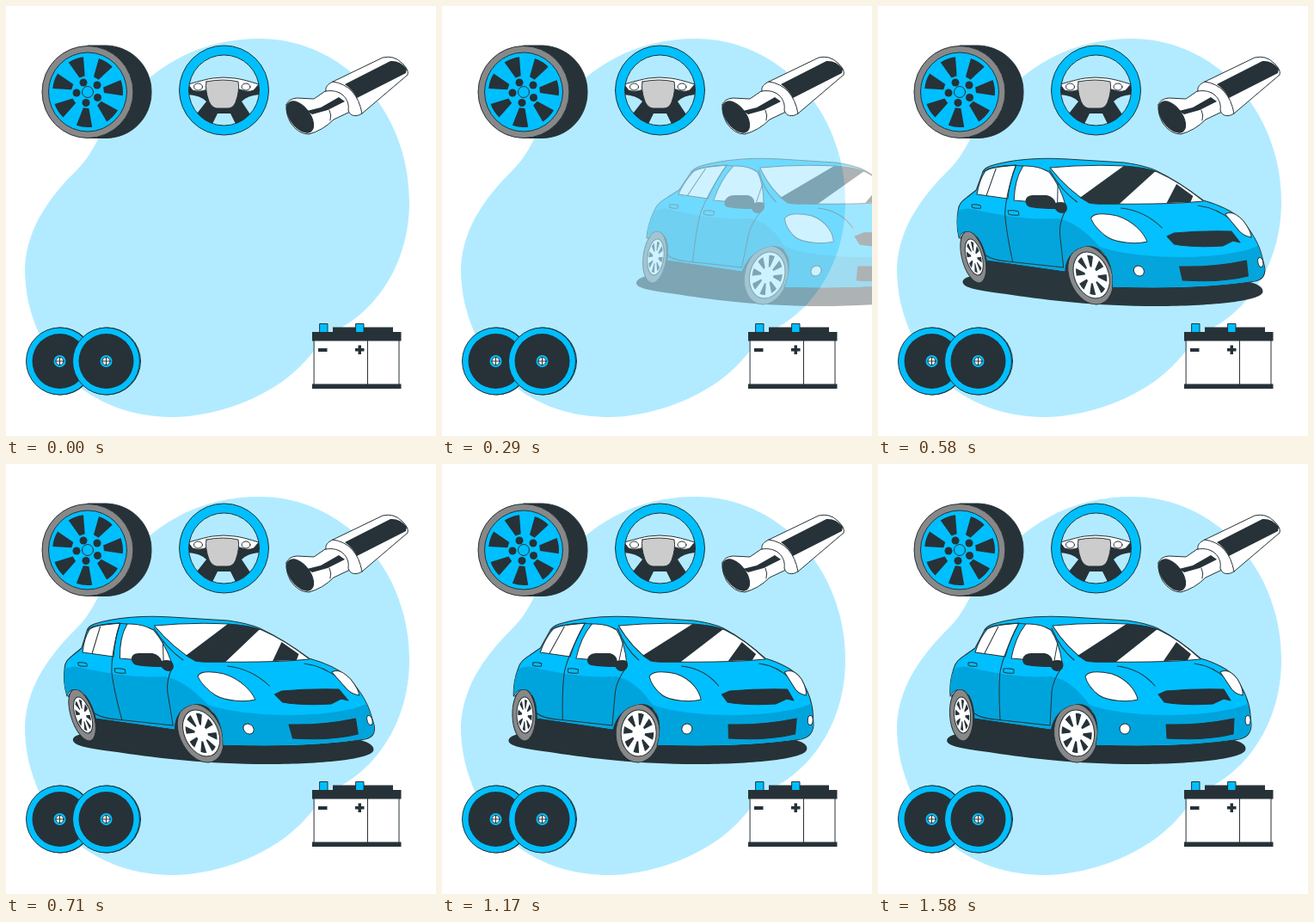
Write an HTML page that moves like this. It is 500 by 500 pixels and loops after 1.62 s.

```html
<!DOCTYPE html>
<html lang="en">
<head>
<meta charset="utf-8">
<title>Car parts</title>
<style>
  html, body { margin: 0; width: 100%; height: 100%; overflow: hidden; background: #fff; }
  svg { display: block; width: 100vw; height: 100vh; }
  .ink { fill: #263238; }
  .blue { fill: #00bfff; }
  .shade { fill: #00a4dc; }
  .white { fill: #fff; }
  .grey { fill: #888; }
  .line { fill: none; }
  .edge, .line { stroke: #263238; stroke-width: 1; stroke-linejoin: round; stroke-linecap: round; }
</style>
</head>
<body>
<svg viewBox="0 0 500 500">
  <path fill="#b2ebff" d="M295 38C390 38 469 120 469 228C469 300 430 352 390 374C366 385 360 402 340 421C300 460 235 478 195 478C120 478 65 440 40 385C28 358 22 335 22 305C24 255 55 218 82 191C107 166 104 150 130 122C170 70 225 38 295 38Z"/>

  <g id="tyre">
    <path class="ink edge" d="M95 46H117C146 47 169 70 169 100S146 153 117 153.500H95Z"/>
    <ellipse class="grey edge" cx="95" cy="100" rx="53" ry="53.500"/>
    <ellipse class="blue edge" cx="95" cy="100" rx="45.500" ry="46"/>
    <path class="ink" id="tyreGaps" transform="translate(95 100)"/>
    <g class="ink">
      <circle cx="90" cy="89" r="4.500"/><circle cx="106" cy="92" r="4.500"/><circle cx="82" cy="101" r="4.500"/>
      <circle cx="106.500" cy="106.500" r="4.500"/><circle cx="93" cy="112.500" r="4.500"/>
    </g>
    <circle class="blue edge" cx="95" cy="100" r="6.500"/>
  </g>

  <g id="steering">
    <path class="ink" d="M212 91Q253 83 295 91L294 103Q281 104 274 111L284 126Q277 134 267 137L261 125H246L240 137Q230 133 222 125L233 111Q226 104 212 103Z"/>
    <path class="white edge" d="M212 91Q233 85 240 84Q253 82 266 84Q275 85 294 91L288 98Q281 101 272 97H234Q225 101 217 98Z"/>
    <ellipse class="white edge" cx="223.500" cy="94" rx="5" ry="4"/>
    <ellipse class="white edge" cx="279" cy="94" rx="5" ry="4"/>
    <path class="edge" fill="#ccc" d="M233 88Q253 84 270 88Q272 98 267 112Q264 119 258 119H245Q239 118 236 111Q231 97 233 88Z"/>
    <path class="blue edge" fill-rule="evenodd" d="M201.500 98a52 52 0 1 0 104 0a52 52 0 1 0 -104 0ZM212.500 98a41 41 0 1 0 82 0a41 41 0 1 0 -82 0Z"/>
  </g>

  <g id="exhaust">
    <path class="white edge" d="M326 115Q328 108 338 107L358 108L377 95L406 110L400 123L381 132Q368 145 352 149Q340 149 331 136Q325 125 326 115Z"/>
    <ellipse class="ink edge" cx="342" cy="129" rx="21" ry="11.500" transform="rotate(53 342 129)"/>
    <path class="ink" d="M350 122L366 118L387 106L394 111L374 121L356 126Z"/>
    <path class="line" d="M376 121Q379 127 377 133"/>
    <path class="white edge" d="M372 99C371 94 374 91 380 88L438 60Q451 57 460 66Q469 74 467 80L414 125C408 129 400 129 398 121C400 108 389 96 372 99Z"/>
    <path class="ink" d="M394 91L447 64Q458 63 466 73L465 78L408 107Q403 97 394 91Z"/>
    <path class="line" d="M380 88Q408 92 414 125"/>
  </g>

  <g id="discs"></g>

  <g id="battery">
    <rect class="white edge" x="358.500" y="388" width="98.500" height="53"/>
    <path class="line" d="M420.500 389V440"/>
    <path class="ink" d="M356 379H380V373.500H450V379H459.500V389.500H356ZM356 439.500H459.500V445H356ZM363 398H373.500V402H363ZM409.500 394.500H413V398H416.500V401.500H413V405H409.500V401.500H406V398H409.500Z"/>
    <path class="blue edge" d="M365 369.500H374V379.500H365ZM407 369.500H416V379.500H407Z"/>
  </g>

  <g id="car" opacity="0">
    <path class="ink" d="M80 322C80 313 100 312 120 314L400 319C425 321 429 328 427 333C420 345 350 349 300 349C230 349 175 342 135 336C100 331 82 329 80 322Z"/>
    <path class="ink" d="M85 270Q95 256 112 275L140 285L205 275L240 276L258 300V330L110 322Z"/>
    <g id="wheels"></g>
    <path class="blue edge" d="M84 270C83 258 85 247 88 238C90 229 96 226 103 221L113 214L124 193Q126 189 134 186C160 178 195 176 225 178L290 182Q312 185 325 191Q350 204 375 226Q402 234 415 247C425 261 432 277 433 292L434 303Q434 317 420 320C370 328 310 329 253 327C259 305 254 280 234 279C214 280 204 294 201 309L112 296C112 276 105 262 96 262Q88 261 84 270Z"/>
    <path class="shade" d="M88.500 238Q100 233 112 238C140 244 170 249 202 247Q225 251 246 280C290 296 390 296 430 279Q433 292 433.500 303Q433 316 420 319.500C370 327 310 328 253.500 326.500C259 305 254 280 234 279C214 280 204 294 201 308L112.500 295C112 276 105 262 96 262Q88 261 84.500 269C83 258 85 247 88.500 238Z"/>
    <path class="white edge" d="M113 219Q118 203 127 192Q130 189 136 188L164 185Q154 202 148 224Z"/>
    <path class="white edge" d="M155 226C158 210 164 196 172 186Q189 185 201 193Q211 208 214 231Z"/>
    <path class="white edge" d="M203 188Q245 184 290 186Q315 188 327 193Q352 205 375 227Q330 231 270 230Q250 231 242 229Q220 215 203 188Z"/>
    <path class="ink" d="M232 223L289 186Q312 187 325 192L277 230Q250 231 242 229ZM332 229L347 207L364 221L360 228Z"/>
    <path class="line" d="M124 220L140 189M205 229L209 207M164 185Q146 220 142 242Q140 262 142 298M214 236Q203 252 202 265L200 304M112 290Q120 296 136 297L200 304M124 193Q145 183 172 186M202 191Q212 215 228 228M278 235Q305 238 322 258M368 232Q390 235 405 250"/>
    <path class="blue edge" d="M105 231Q110 230 115 232V235Q109 236 105 234ZM146 238Q152 237 158 239V243Q151 244 146 242Z"/>
    <path class="ink" d="M168 227Q170 220 178 220L194 220Q202 222 203 229Q209 227 214 229Q218 236 212 240Q205 243 201 236Q185 236 173 234Q168 233 168 227Z"/>
    <path class="white edge" d="M241 247C245 240 258 241 272 244C290 250 300 264 302 274C290 277 268 276 257 269Q244 259 241 247Z"/>
    <path class="white edge" d="M398 242Q408 237 418 250Q425 262 424 269Q414 268 408 257Z"/>
    <path class="ink edge" d="M326 268L335 264Q370 261 402 262L410 275L402 273L389 279Q355 281 333 277Z"/>
    <path class="ink edge" d="M335 303Q375 304 414 296L413 314Q380 322 336 319Z"/>
    <circle class="white edge" cx="287" cy="308" r="6"/>
    <ellipse class="white edge" cx="430" cy="298" rx="3" ry="5.500"/>
  </g>
</svg>
<script>
const $ = id => document.getElementById(id);
const LOOP = 1620, STEP = 1000 / 24, DURATION = 1600;

// Evenly spread openings between spokes; angles in degrees.
function gaps(count, first, inner, outer, innerHalf, outerHalf) {
  const at = (r, a) => `${r * Math.cos(a * Math.PI / 180)} ${r * Math.sin(a * Math.PI / 180)}`;
  return Array.from({ length: count }, (_, i) => {
    const angle = first + i * 360 / count;
    return `M${at(inner, angle - innerHalf)}L${at(outer, angle - outerHalf)}` +
      `A${outer} ${outer} 0 0 1 ${at(outer, angle + outerHalf)}L${at(inner, angle + innerHalf)}Z`;
  }).join('');
}

$('tyreGaps').setAttribute('d', gaps(7, -110, 19, 41, 10, 13));

$('discs').innerHTML = [62.5, 116.5].map(x => `
  <g transform="translate(${x} 413)">
    <circle class="blue edge" cx="1" r="39"/>
    <circle class="blue edge" r="39"/>
    <circle class="ink" r="32"/>
    <circle class="blue" r="7"/>
    <circle class="white edge" r="4.5"/>
    <path class="line" d="M-4.500 0H4.500M0 -4.500V4.500"/>
  </g>`).join('');

const spokes = gaps(8, 12, 10, 24, 7, 11);
const wheel = (x, y, tyreX, tyreY, rimX, rimY) => `
  <g transform="translate(${x} ${y}) rotate(-4)">
    <ellipse class="grey edge" rx="${tyreX}" ry="${tyreY}"/>
    <ellipse class="white edge" cx="1" rx="${rimX}" ry="${rimY}"/>
    <path class="ink" transform="translate(1 0) scale(${rimX / 28} ${rimY / 28})" d="${spokes}"/>
  </g>`;
$('wheels').innerHTML = wheel(97, 292, 13.5, 30, 9.5, 21) + wheel(230, 313, 25.5, 34, 20.5, 27);

// Cubic Bezier easing that overshoots before it settles.
function ease(x) {
  const curve = (u, a, b) => 3 * (1 - u) ** 2 * u * a + 3 * (1 - u) * u * u * b + u ** 3;
  let low = 0, high = 1;
  for (let i = 0; i < 24; i++) {
    const mid = (low + high) / 2;
    if (curve(mid, .322, .446) < x) low = mid; else high = mid;
  }
  return curve(low, -.1, 1.45);
}

const keys = [
  { at: 0, x: 250, skew: -20, opacity: 0 },
  { at: .6, x: 0, skew: 10, opacity: 1 },
  { at: .8, x: 0, skew: -2, opacity: 1 },
  { at: 1, x: 0, skew: 0, opacity: 1 },
];

function draw(time) {
  const step = Math.floor((time % LOOP + 5) / STEP);
  const progress = step < 3 ? 0 : Math.min(step * STEP / DURATION, 1);
  const i = progress < .6 ? 0 : progress < .8 ? 1 : 2;
  const from = keys[i], to = keys[i + 1];
  const p = ease((progress - from.at) / (to.at - from.at));
  const mix = name => from[name] + (to[name] - from[name]) * p;
  $('car').setAttribute('transform', `translate(${mix('x')} 250) skewX(${mix('skew')}) translate(0 -250)`);
  $('car').setAttribute('opacity', Math.min(Math.max(mix('opacity'), 0), 1));
}

const start = performance.now();
function tick() {
  draw(performance.now() - start);
  requestAnimationFrame(tick);
}
tick();
</script>
</body>
</html>
```
